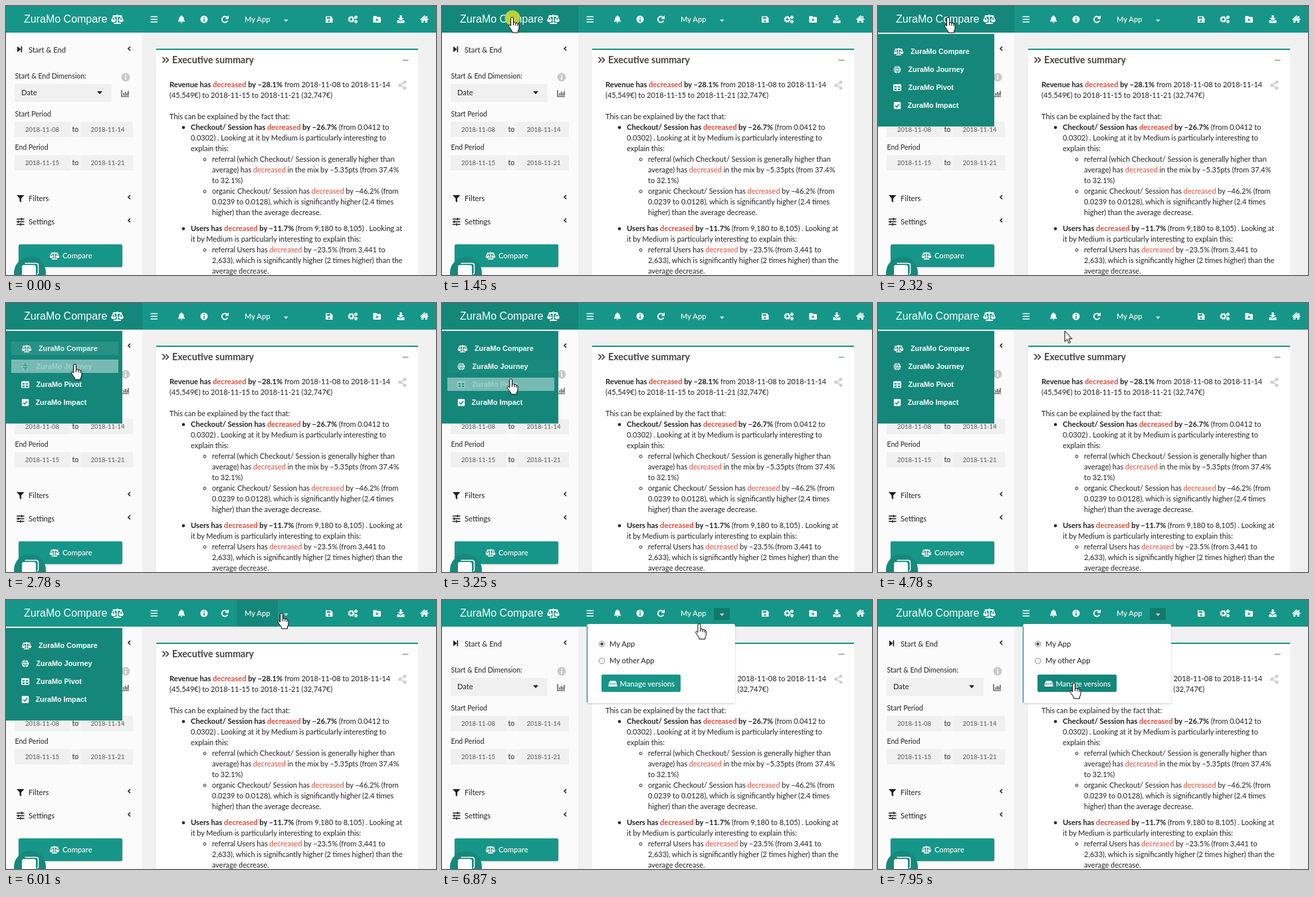
Write an HTML page that moves like this. It is 647x404 px and loops after 8 s.

```html
<!DOCTYPE html>
<html lang="en">
<head>
<meta charset="utf-8">
<title>Compare dashboard</title>
<style>
  html, body { margin: 0; width: 100%; height: 100%; overflow: hidden; background: #f1f1f2; }
  svg { display: block; }
  text { font: 11.2px Lato, sans-serif; fill: #222; white-space: pre; }
  #report text { font-size: 11px; word-spacing: -.2px; }
  #report .b { font-size: 11.2px; }
  .small { font-size: 10.5px; }
  .date { font-size: 9.5px; fill: #555; text-anchor: middle; }
  .white { fill: #fff; font-weight: 500; }
  .title { font: 16px "Liberation Sans", Arial, sans-serif; fill: #fff; }
  .head { font-size: 14.2px; font-weight: 700; fill: #444; }
  .b { font-weight: 700; }
  .r { fill: #dd4b39; }
  .item text { font: bold 10.8px "Liberation Sans", Arial, sans-serif; fill: inherit; }
  .line { fill: none; stroke: currentColor; stroke-width: 1.6; }
</style>
</head>
<body>
<svg width="647" height="404" viewBox="0 0 647 404">
  <defs>
    <symbol id="scales" viewBox="0 0 20 16" fill="currentColor">
      <path d="M9 .5h2v13h4.500V15.500h-11v-2H9zM3 2h14v2H3zM.3 9.500h7.400a3.700 3.200 0 0 1-7.400 0zM12.300 9.500h7.400a3.700 3.200 0 0 1-7.400 0z"/>
      <path d="M4 3 1.200 9.500h5.600zM16 3l-2.800 6.500h5.600z" fill="none" stroke="currentColor" stroke-width="1.400"/>
    </symbol>
    <symbol id="globe" viewBox="0 0 12 12">
      <circle cx="6" cy="6" r="5.4" fill="currentColor"/>
      <path d="M.6 4.2h10.8M.6 7.8h10.8M6 .6v10.8M6 .6q-5 5.4 0 10.8M6 .6q5 5.4 0 10.8" fill="none" stroke="#14877a" stroke-width=".7"/>
    </symbol>
    <symbol id="table" viewBox="0 0 12 12">
      <rect y="1" width="12" height="10" rx="1.2" fill="currentColor"/>
      <path d="M1.6 4h3.6v2H1.6zM6.8 4h3.6v2H6.8zM1.6 7.4h3.6v2H1.6zM6.8 7.4h3.6v2H6.8z" fill="#14877a"/>
    </symbol>
    <symbol id="check" viewBox="0 0 12 12">
      <rect x=".8" y=".8" width="10.4" height="10.4" rx="1.2" fill="currentColor"/>
      <path d="m3 6 2.2 2.3 4-4.3" fill="none" stroke="#14877a" stroke-width="1.6"/>
    </symbol>
    <filter id="shadow" x="-10%" y="-10%" width="120%" height="130%">
      <feDropShadow dx="0" dy="1" stdDeviation="1" flood-opacity=".22"/>
    </filter>
  </defs>

  <!-- report card -->
  <rect x="226" y="64" width="394" height="340" fill="#fff"/>
  <rect x="226" y="64" width="394" height="2" fill="#169688"/>
  <path d="m235.500 77 4 4-4 4m5-8 4 4-4 4" class="line" color="#333"/>
  <text x="250" y="86" class="head">Executive summary</text>
  <path d="M596.500 81.500h9" class="line" color="#86a5a2"/>
  <g color="#d0d0d0" fill="#d0d0d0">
    <path d="m600 114.500-7 4.500 7 4.500" class="line"/>
    <circle cx="600" cy="114.500" r="2.500"/><circle cx="592.500" cy="119" r="2.500"/><circle cx="600" cy="123.500" r="2.500"/>
  </g>
  <g id="report"></g>

  <!-- sidebar -->
  <rect y="40" width="205" height="364" fill="#fbfbfc"/>
  <path d="M17 60.500v9l5.500-4.500zM22.500 60.500h1.700v9h-1.700z" fill="#222"/>
  <text x="34" y="70">Start &amp; End</text>
  <path d="m187 61-3 3 3 3m0 217-3 3 3 3m0 29-3 3 3 3" class="line" color="#222"/>
  <text x="13.500" y="109" class="small">Start &amp; End Dimension:</text>
  <circle cx="180" cy="107" r="6.500" fill="#c9c9c9"/>
  <path d="M179.200 103h1.700v1.700h-1.700zM179.200 106h1.700v5h-1.700z" fill="#fff"/>
  <rect x="13" y="117" width="146" height="27" fill="#f0f0f0"/>
  <text x="23" y="134">Date</text>
  <path d="M137 128h8l-4 4.500z" fill="#222"/>
  <path d="M174 126v10h11M177 131v3.500m2.500-5.500v5.500m2.300-4v4m2.200-7v7" class="line" color="#333" style="stroke-width:1.200"/>
  <text x="13.500" y="166" class="small">Start Period</text>
  <text x="13.500" y="216" class="small">End Period</text>
  <g id="dates"></g>
  <path d="M16 284h11.500l-4.500 5v6l-2.500-1.800V289z" fill="#222"/>
  <text x="34" y="293">Filters</text>
  <path d="M16 320h11.500M16 324h11.500M16 328h11.500M23.500 318v4M18.500 322v4M22 326v4" class="line" color="#222" style="stroke-width:1.300"/>
  <text x="34" y="328">Settings</text>
  <rect x="19" y="358" width="156" height="34" rx="2" fill="#169688" filter="url(#shadow)"/>
  <use href="#scales" x="65.500" y="369" width="15" height="12" color="#fff"/>
  <text x="85" y="379" class="white">Compare</text>
  <circle cx="36" cy="401" r="24" fill="#14897c" filter="url(#shadow)"/>
  <path d="M28.500 386.500h17q3 0 3 3v11q0 2-2 2" fill="none" stroke="#fff" stroke-width="1.500"/>
  <rect x="24" y="389" width="21" height="18" rx="3" fill="#fff"/>

  <!-- top bar -->
  <rect width="647" height="40" fill="#169688"/>
  <rect id="logoHover" width="205" height="40" fill="#14877a"/>
  <rect id="appHover" x="347" width="62" height="40" fill="#14877a"/>
  <rect id="caretHover" x="409" y="12" width="24" height="18" rx="2" fill="#12796d"/>
  <text x="27" y="25" class="title">ZuraMo Compare</text>
  <use href="#scales" x="158" y="12" width="19" height="15.500" color="#fff"/>
  <g fill="#fff" color="#fff">
    <path d="M217.500 16h10.500M217.500 20h10.500M217.500 24h10.500" class="line"/>
    <path d="M258.500 23.500q2-2 2-5 0-3 3.500-3.500 3.500.5 3.500 3.500 0 3 2 5zM262.500 24.500h3q-1.500 2.500-3 0zM263.500 14h1v2h-1z"/>
    <circle cx="298" cy="20" r="5.500"/>
    <path d="M297.200 16.600h1.700v1.700h-1.700zM297.200 19.300h1.700v4.200h-1.700z" fill="#169688"/>
    <path d="M332.800 17.500a4.400 4.400 0 1 0 .5 4.500" class="line" style="stroke-width:1.900"/>
    <path d="M335 14v5.500h-5.500z"/>
    <text x="359" y="24" class="white">My App</text>
    <path d="M418 20.500h6.500l-3.200 3.300z"/>
    <path d="M481 15.500h8l2.500 2.500v7h-10.500z"/>
    <path d="M483 16.800h5v2.500h-5z" fill="#169688"/><circle cx="486" cy="22.500" r="1.500" fill="#169688"/>
    <g fill="none" stroke="#fff">
      <circle cx="519.500" cy="20" r="3" stroke-width="2"/><circle cx="519.500" cy="20" r="4.300" stroke-width="1.400" stroke-dasharray="1.700"/>
      <circle cx="526.500" cy="17" r="1.600" stroke-width="1.700"/><circle cx="526.500" cy="23.500" r="1.600" stroke-width="1.700"/>
    </g>
    <path d="M552.500 16q0-1 1-1h3.500l1.500 1.500h4.500q1 0 1 1V24q0 1-1 1h-9.500q-1 0-1-1z"/>
    <path d="M558.200 18.500v4.500M556 20.800h4.500" class="line" color="#169688" style="stroke-width:1.200"/>
    <path d="M592.500 14h3v4h3l-4.500 4.500-4.500-4.500h3zM588.500 21.500h3l2.500 2.300 2.500-2.300h3v4h-11z"/>
    <path d="m629.500 14 6.500 6-1 1-5.500-5-5.500 5-1-1zM625 20.800l4.500-4 4.500 4V25h-3.200v-3h-2.600v3H625zM632.500 15h1.500v3l-1.500-1.400z"/>
  </g>

  <g id="menu">
    <rect y="42" width="175" height="139" fill="#14877a"/>
  </g>

  <g id="dropdown">
    <rect x="218" y="36" width="223" height="119" rx="3" fill="#fff" filter="url(#shadow)"/>
    <path d="M218.500 40v114" stroke="#169688" stroke-width="1.200"/>
    <g fill="#f4f4f4" stroke="#8c8c8c">
      <circle cx="240.500" cy="66" r="4.300"/><circle cx="240.500" cy="91.500" r="4.300"/>
    </g>
    <circle cx="240.500" cy="66" r="2.200" fill="#444"/>
    <text x="252" y="70">My App</text>
    <text x="252" y="95">My other App</text>
    <rect id="manage" x="240" y="112" width="119" height="26" rx="2"/>
    <path d="m253 121.500h8l2.500 4h-13zM250.500 126.500h13v3.500h-13z" fill="#fff"/>
    <text x="267.500" y="129.500" class="white">Manage versions</text>
  </g>

  <circle id="click" r="11.500" fill="#b9d03c"/>
  <g id="cursor" fill="#fff" stroke="#000" stroke-linejoin="round">
    <g id="hand" transform="translate(-1.500 -1)">
      <path d="M-2 1.500Q-2 0 0 0T2 1.500V8Q4.500 7 5.500 8.500 8 7.800 8.500 9.500 10.500 9.300 10.500 11.500V16Q10.500 18 9 20V23H0V21L-4.500 14.500Q-6 12-4.500 11.300-3.200 11-2 13z"/>
      <path d="M2 8v4M5.300 8.500v4M8.300 9.500V13" fill="none"/>
    </g>
    <path id="arrow" d="M0 0v16l3.700-3.500 2.400 5.800 2.400-1-2.400-5.600H11z"/>
  </g>
</svg>

<script>
const $ = id => document.getElementById(id);
const add = (id, html) => $(id).insertAdjacentHTML('beforeend', html);
const show = (id, on) => $(id).style.display = on ? '' : 'none';

// *bold*, ~red~, ^bold red^
const markup = s => s
  .replace(/\*(.+?)\*/g, '<tspan class="b">$1</tspan>')
  .replace(/~(.+?)~/g, '<tspan class="r">$1</tspan>')
  .replace(/\^(.+?)\^/g, '<tspan class="b r">$1</tspan>');

const report = [
  [246, 122, '*Revenue has* ^decreased^* by −28.1%* from 2018-11-08 to 2018-11-14'],
  [246, 138, '(45,549€) to 2018-11-15 to 2018-11-21 (32,747€)'],
  [246, 170, 'This can be explained by the fact that:'],
  [278, 186, '*Checkout/ Session has* ^decreased^* by −26.7%* (from 0.0412 to'],
  [278, 202, '0.0302) . Looking at it by Medium is particularly interesting to'],
  [278, 218, 'explain this:'],
  [310, 234, 'referral (which Checkout/ Session is generally higher than'],
  [310, 250, 'average) has ~decreased~ in the mix by −5.35pts (from 37.4%'],
  [310, 266, 'to 32.1%)'],
  [310, 282, 'organic Checkout/ Session has ~decreased~ by −46.2% (from'],
  [310, 298, '0.0239 to 0.0128), which is significantly higher (2.4 times'],
  [310, 314, 'higher) than the average decrease.'],
  [278, 338, '*Users has* ^decreased^* by −11.7%* (from 9,180 to 8,105) . Looking at'],
  [278, 354, 'it by Medium is particularly interesting to explain this:'],
  [310, 370, 'referral Users has ~decreased~ by −23.5% (from 3,441 to'],
  [310, 386, '2,633), which is significantly higher (2 times higher) than the'],
  [310, 402, 'average decrease.']
];
for (const [x, y, s] of report) add('report', `<text x="${x}" y="${y}">${markup(s)}</text>`);
for (const y of [182.5, 334.5]) add('report', `<circle cx="267" cy="${y}" r="2.300" fill="#222"/>`);
for (const y of [230.5, 278.5, 366.5]) add('report', `<circle cx="299" cy="${y}" r="2" fill="none" stroke="#222"/>`);

[[174, '08', '14'], [224, '15', '21']].forEach(([y, from, to]) => add('dates', `
  <rect x="13" y="${y}" width="178" height="23" fill="#f0f0f0"/>
  <rect x="96" y="${y}" width="17" height="23" fill="#f4f4f4"/>
  <text x="54.500" y="${y + 15}" class="date">2018-11-${from}</text>
  <text x="99.500" y="${y + 15}" class="small">to</text>
  <text x="153" y="${y + 15}" class="date">2018-11-${to}</text>`));

// name, icon, text x, row top, hover start, hover end
const items = [
  ['Compare', 'scales', 49, 58, 2480, 2615],
  ['Journey', 'globe', 45.5, 85, 2680, 3056],
  ['Pivot', 'table', 45.5, 112, 3150, 3500],
  ['Impact', 'check', 44.5, 139, 3620, 4180]
];
items.forEach(([name, icon, x, y], i) => add('menu', `<g class="item" id="item${i}">
  <rect x="8" y="${y}" width="161" height="${i < 3 ? 20 : 21}" fill="#fff"/>
  <use href="#${icon}" x="${i ? 23 : 23.5}" y="${y + 4.5}" width="${i ? 12 : 15}" height="12"/>
  <text x="${x}" y="${y + 14.3}">ZuraMo ${name}</text></g>`));

// time, x, y of the pointer
const path = [
  [220, 362, 250], [450, 208, 36], [600, 208, 36], [780, 40, 29], [990, 107, 18],
  [2320, 107, 18], [2780, 105, 93], [3090, 105, 107], [3170, 105, 110], [3250, 105, 115],
  [3600, 108, 138], [3900, 108, 143], [4090, 108, 143], [4350, 190, 249], [4780, 281, 42],
  [4860, 281, 40], [5400, 455, 20], [5500, 455, 20], [5550, 450, 20], [5780, 450, 20],
  [5860, 410, 20], [5940, 410, 20], [6010, 416, 21], [6720, 416, 21], [7410, 290, 93],
  [7560, 290, 93], [7950, 296, 126], [8000, 296, 126]
];
const clamp = v => Math.min(1, Math.max(0, v));
const mix = (a, b, k) => a + (b - a) * k;
const between = (t, a, b) => t >= a && t < b;

function pointer(t) {
  const i = Math.max(1, path.findIndex(p => p[0] > t));
  const [a, b] = [path[i - 1], path[i]];
  const k = clamp((t - a[0]) / (b[0] - a[0]));
  return [mix(a[1], b[1], k), mix(a[2], b[2], k)];
}

function hover(t, start, end) {
  const rise = u => 1 - (1 - clamp((u - start) / 400)) ** 2;
  return t < end ? rise(t) : rise(end) * clamp(1 - (t - end) / 200);
}

function draw(t) {
  const [x, y] = pointer(t);
  show('cursor', t >= 220);
  $('cursor').setAttribute('transform', `translate(${x} ${y})`);
  const arrow = t < 450 || between(t, 4200, 4860) || between(t, 5400, 5780);
  show('arrow', arrow);
  show('hand', !arrow);

  show('click', between(t, 1450, 1610) || between(t, 6400, 6470));
  $('click').setAttribute('cx', x - 1);
  $('click').setAttribute('cy', y);
  $('click').setAttribute('opacity', between(t, 1540, 1610) ? .5 : 1);

  show('logoHover', between(t, 450, 4250));
  show('appHover', between(t, 5100, 6470));
  show('caretHover', t >= 6470);
  show('menu', between(t, 1540, 6470));
  show('dropdown', t >= 6470);
  $('manage').setAttribute('fill', t > 7750 ? '#14877a' : '#169688');

  items.forEach(([, , , , start, end], i) => {
    const k = hover(t, start, end), item = $('item' + i);
    const color = `rgb(${mix(255, 22, k)},${mix(255, 150, k)},${mix(255, 136, k)})`;
    item.firstElementChild.setAttribute('opacity', k * .96);
    item.style.color = item.style.fill = color;
  });
}

(function frame() {
  draw(performance.now() % 8000);
  requestAnimationFrame(frame);
})();
</script>
</body>
</html>
```
